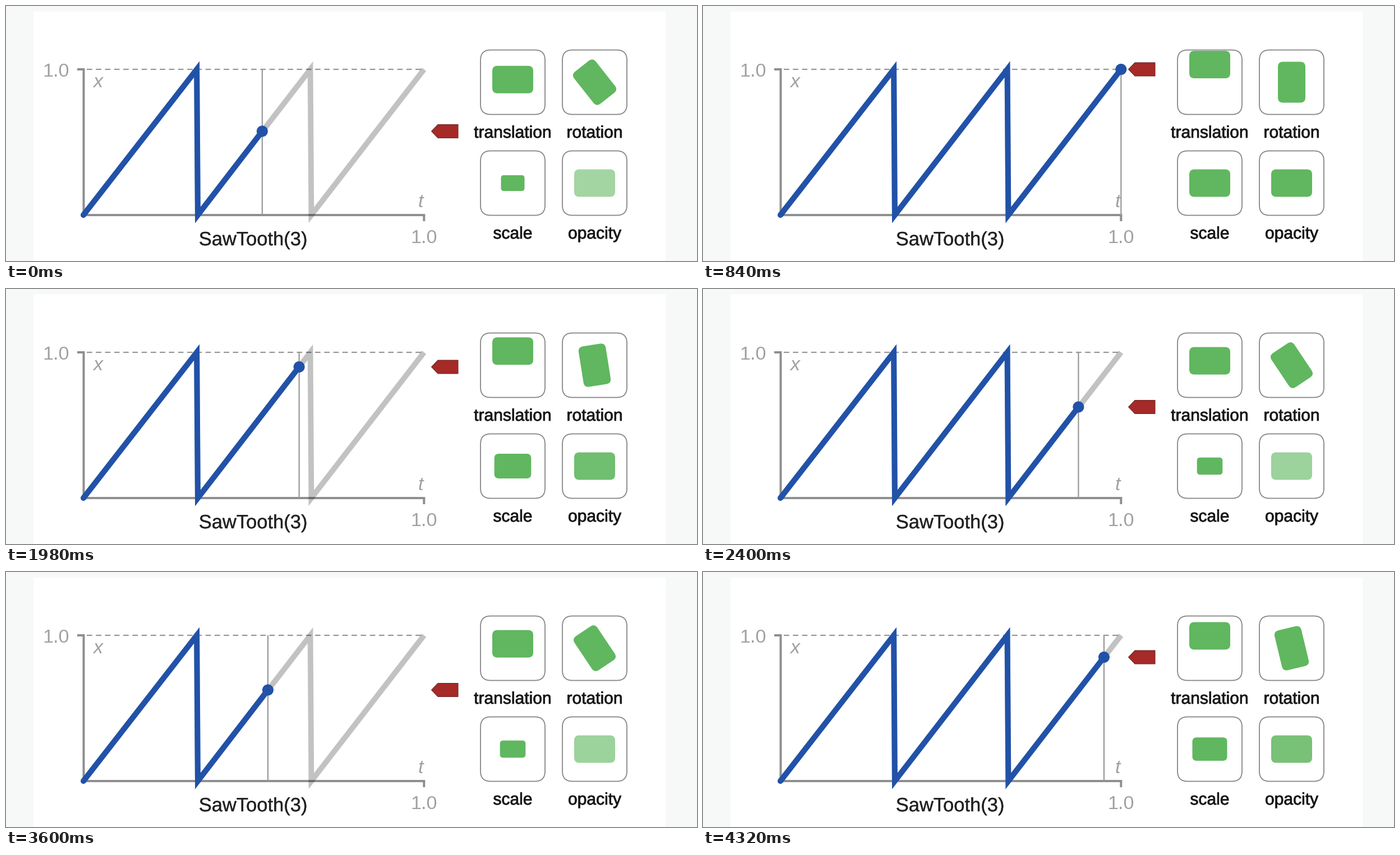
A matplotlib script for the animation above (4380 ms loop, 1232 px wide and 455 px high).

```python
import matplotlib.pyplot as plt
import matplotlib.patheffects as pe
from matplotlib.animation import FuncAnimation
from matplotlib.patches import Circle, FancyBboxPatch, Polygon, Rectangle
from matplotlib.transforms import Affine2D

W, H, DPI = 1232, 455, 100
FRAMES, STEP = 73, 60
CYCLE, TEETH = 1800, 3            # ms per sweep, teeth per sweep
X0, X1, TOP, BASE = 138, 745.3, 113, 373
PX = 72 / DPI                     # points per pixel

BLUE, GREEN, RED = "#2152a8", "#60b75f", "#a52a28"
AXIS, LABEL, INK = "#8f8f8f", "#a0a0a0", "#222222"

plt.rcParams["path.snap"] = False  # keep soft edges at fractional positions
fig = plt.figure(figsize=(W / DPI, H / DPI), dpi=DPI, facecolor="#f7f9f8")
ax = fig.add_axes([0, 0, 1, 1])
ax.set_xlim(0, W)
ax.set_ylim(H, 0)
ax.axis("off")


def line(xs, ys, color, width, z, **kw):
    kw.setdefault("solid_capstyle", "butt")
    return ax.plot(xs, ys, color=color, lw=width * PX, zorder=z, **kw)[0]


def text(x, y, s, size, color, weight=0, **kw):
    t = ax.text(x, y, s, fontsize=size * PX, color=color, ha="center",
                va="baseline", family="Liberation Sans", zorder=3, **kw)
    if weight:
        t.set_path_effects([pe.withStroke(linewidth=weight * PX, foreground=color)])
    return t


def rounded(x, y, w, h, r, **kw):
    style = f"round,pad=0,rounding_size={r}"
    return ax.add_patch(FancyBboxPatch((x, y), w, h, boxstyle=style, **kw))


def saw(ms):
    """Height of the saw tooth, 0 to 1, at a time within the sweep."""
    return 1.0 if ms == CYCLE else (ms * TEETH % CYCLE) / CYCLE


def at(ms):
    return X0 + (X1 - X0) * ms / CYCLE, BASE + (TOP - BASE) * saw(ms)


def curve(ms):
    """Points of the saw tooth from the start of the sweep up to a time."""
    pts = [(X0, BASE)]
    end = at(ms)
    for k in range(1, TEETH):
        wrap = k * CYCLE // TEETH
        x = at(wrap)[0]
        if ms >= wrap:
            pts.append((x - 0.3, TOP))
            if end[0] > x + 1.5:
                pts.append((x + 1.5, BASE))
    pts.append(end)
    return zip(*pts)


# Panel, axes and captions
ax.add_patch(Rectangle((49, 10), 1127, H, fc="white", lw=0, zorder=0))
line([X0 + 0.5, X0 + 0.5], [TOP - 2, BASE], AXIS, 4, 2)
line([127, X0 + 2], [TOP, TOP], AXIS, 4, 2)
line([X0 - 2, X1 + 2], [BASE, BASE], AXIS, 4, 2)
line([X1, X1], [BASE, 384], AXIS, 4, 2)
line([X0 + 6, X1], [TOP, TOP], "#969696", 2.2, 2, ls=(0, (4.4, 3)),
     dash_capstyle="butt")
text(89, 126, "1.0", 34.2, LABEL)
text(745, 423, "1.0", 34.2, LABEL)
text(163.5, 145, "x", 34, LABEL, style="italic")
text(739, 359, "t", 34, LABEL, style="italic")
text(440.5, 427, "SawTooth(3)", 34.5, INK, 0.3)

BOXES = {"translation": (903.5, 136), "rotation": (1049.5, 136),
         "scale": (903.5, 316), "opacity": (1049.5, 316)}
tiles = {}
for name, (cx, cy) in BOXES.items():
    rounded(cx - 57.5, cy - 57.5, 115, 115, 18, fc="none", ec="#868686",
            lw=1.8 * PX, zorder=3)
    text(cx, cy + 99, name, 30, "#181818", 0.8)
    tiles[name] = rounded(-36.5, -24.5, 73, 49, 9, fc=GREEN, lw=0, zorder=4)

# Curve and moving parts
line(*curve(CYCLE), "black", 9.8, 4, alpha=0.24, solid_joinstyle="miter")
guide = line([X0, X0], [TOP, BASE], "#989898", 2.2, 3)
done = line([], [], BLUE, 10, 5, solid_joinstyle="miter")
ax.add_patch(Circle((X0, BASE), 5, fc=BLUE, lw=0, zorder=5))
dot = ax.add_patch(Circle((X0, BASE), 10, fc=BLUE, lw=0, zorder=6))
arrow = ax.add_patch(Polygon([(0, 0)], fc=RED, ec="#6b2623", lw=PX, zorder=6))


def place(name, dy=0, scale=1, turn=0):
    cx, cy = BOXES[name]
    move = Affine2D().scale(scale).rotate_deg(turn).translate(cx, cy + dy)
    tiles[name].set_transform(move + ax.transData)


def draw(n):
    # The clock gains a quarter step once every thirty frames
    clock = 945 + STEP * n + 15 * ((n + 26) // 30)
    ms = clock % CYCLE or CYCLE
    v = saw(ms)
    x, y = at(ms)

    guide.set_xdata([x, x])
    done.set_data(*curve(ms))
    dot.center = (x, y)
    arrow.set_xy([(758.5, y), (770, y - 12), (806, y - 12),
                  (806, y + 12), (770, y + 12)])

    place("translation", dy=31.5 - 63 * v)
    place("rotation", turn=90 * v)
    place("scale", scale=max(v, 1e-3))
    place("opacity")
    tiles["opacity"].set_alpha(v)
    return guide, done, dot, arrow, *tiles.values()


anim = FuncAnimation(fig, draw, frames=FRAMES, interval=STEP,
                     init_func=lambda: draw(0), repeat=True, repeat_delay=0)
plt.show()
```
